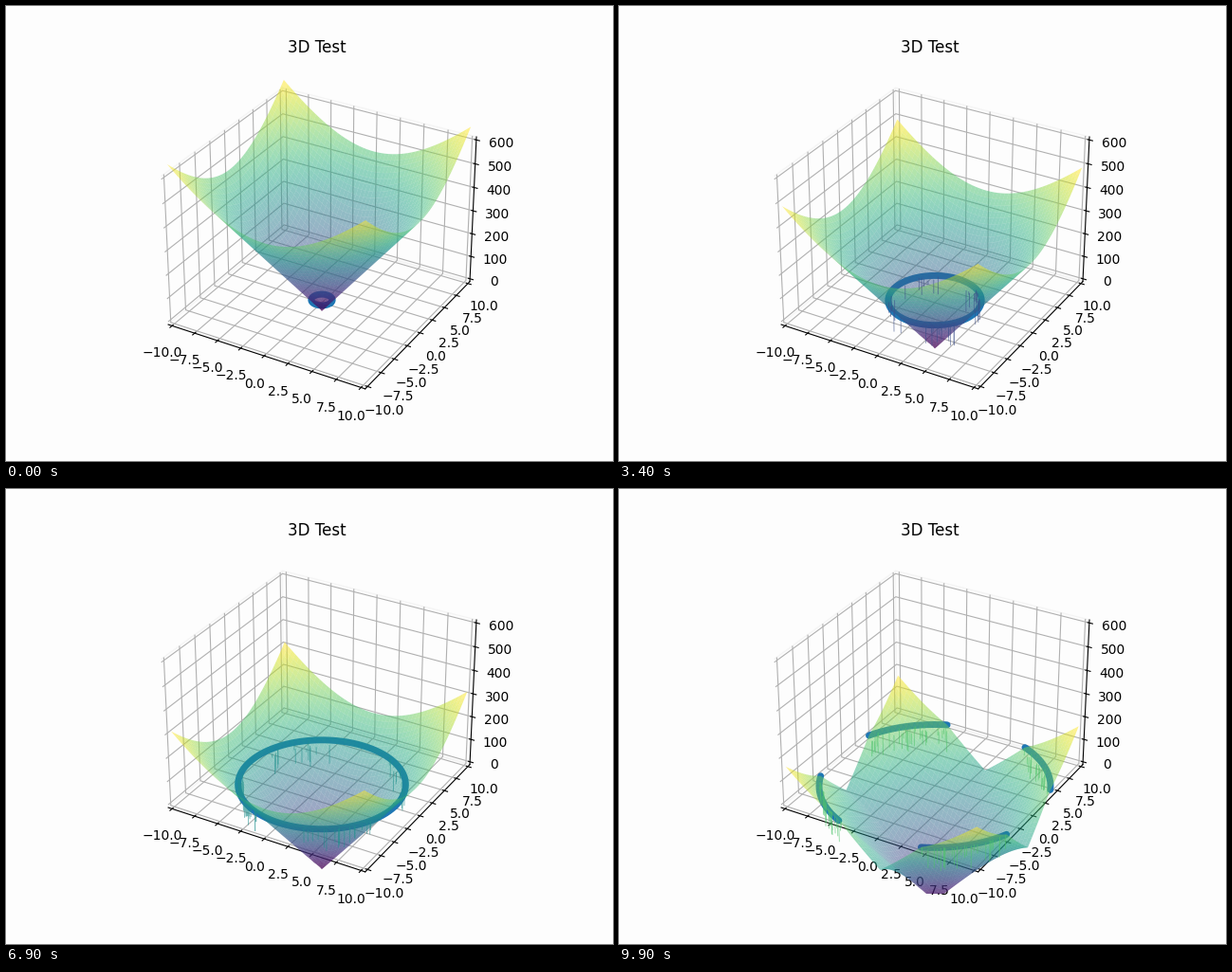
These frames come from a looping animation (640 px wide and 480 px high, 10 s). A matplotlib script:

```python
import numpy as np
import matplotlib.pyplot as plt
from matplotlib.animation import FuncAnimation
from mpl_toolkits.mplot3d.art3d import Poly3DCollection

FRAMES = 100
SIZE = 10       # half width of the square domain
SLOPE = 50      # height gained per unit of distance
ALPHA = 0.5
BG = "#fdfdfd"
RING = "#1f77b4"

cmap = plt.get_cmap("viridis")
axis = np.linspace(-SIZE, SIZE, 51)
X, Y = np.meshgrid(axis, axis)
DIST = np.hypot(X, Y)
FAR = np.maximum(abs(X), abs(Y))
NEAR = np.minimum(abs(X), abs(Y))


def height(radius):
    """Signed distance to the part of the circle inside the domain."""
    d = DIST - radius
    if radius > SIZE:
        end = np.sqrt(radius**2 - SIZE**2)
        to_end = np.hypot(SIZE - FAR, end - NEAR)
        cut_off = NEAR * SIZE < end * FAR
        d = np.where(cut_off, d - 0.66 * (to_end + d), d)
    return SLOPE * d


def quads(z):
    p = np.stack([X, Y, z], axis=-1)
    corners = [p[:-1, :-1], p[1:, :-1], p[1:, 1:], p[:-1, 1:]]
    return np.stack(corners, axis=2).reshape(-1, 4, 3)


def circle(radius):
    t = np.linspace(0, 2 * np.pi, 721)
    x, y = radius * np.cos(t), radius * np.sin(t)
    outside = np.maximum(abs(x), abs(y)) > SIZE
    x[outside] = np.nan
    return x, y, np.zeros_like(t)


def spikes(n, radius):
    """Thin drops just inside the circle, around the diagonals."""
    rng = np.random.default_rng(n)
    count = 0 if n < 20 else int(10 * radius)
    if n % 7 == 4:
        count //= 8
    spread = 0.5
    if radius > SIZE:
        spread = np.pi / 4 - np.arccos(SIZE / radius)
    t = np.pi / 4 + rng.integers(0, 4, count) * np.pi / 2
    t = t + rng.uniform(-spread, spread, count)
    r = radius - rng.uniform(0, 0.5, count)
    top = SLOPE * (r - radius)
    low = top - rng.uniform(10, 95, count)
    gap = np.full(count, np.nan)
    x, y = r * np.cos(t), r * np.sin(t)
    return [np.column_stack(c).ravel()
            for c in ((x, x, gap), (y, y, gap), (top, low, gap))]


fig = plt.figure(figsize=(6.4, 4.8), dpi=100, facecolor=BG)
ax = fig.add_subplot(projection="3d", computed_zorder=False)
ax.set_facecolor(BG)
ax.set_title("3D Test")

ring, = ax.plot([0], [0], [0], color=RING, lw=5, zorder=1,
                solid_capstyle="round", solid_joinstyle="round")
drops, = ax.plot([0], [0], [0], lw=0.6, alpha=0.65, zorder=3)
surface = Poly3DCollection(quads(height(1)), linewidths=0,
                           edgecolors="none", zorder=2)
ax.add_collection3d(surface)

pad = 2 * SIZE / 48
ax.set_xlim(-SIZE - pad, SIZE + pad)
ax.set_ylim(-SIZE - pad, SIZE + pad)
ax.set_zlim(-600 / 48, 600 + 600 / 48)
for a in (ax.xaxis, ax.yaxis, ax.zaxis):
    a.pane.set_facecolor(BG)
    a.pane.set_edgecolor("#ededed")


def update(n):
    radius = 1 + 0.1 * n
    faces = quads(height(radius))
    mean = faces[:, :, 2].mean(axis=1)
    low, span = mean.min(), np.ptp(mean)
    surface.set_verts(faces)
    surface.set_facecolor(cmap((mean - low) / span, alpha=ALPHA))
    ring.set_data_3d(*circle(radius))
    drops.set_data_3d(*spikes(n, radius))
    drops.set_color(cmap((-40 - low) / span))
    return surface, ring, drops


anim = FuncAnimation(fig, update, frames=FRAMES, interval=100,
                     repeat=True, repeat_delay=0, blit=False)
plt.show()
```
